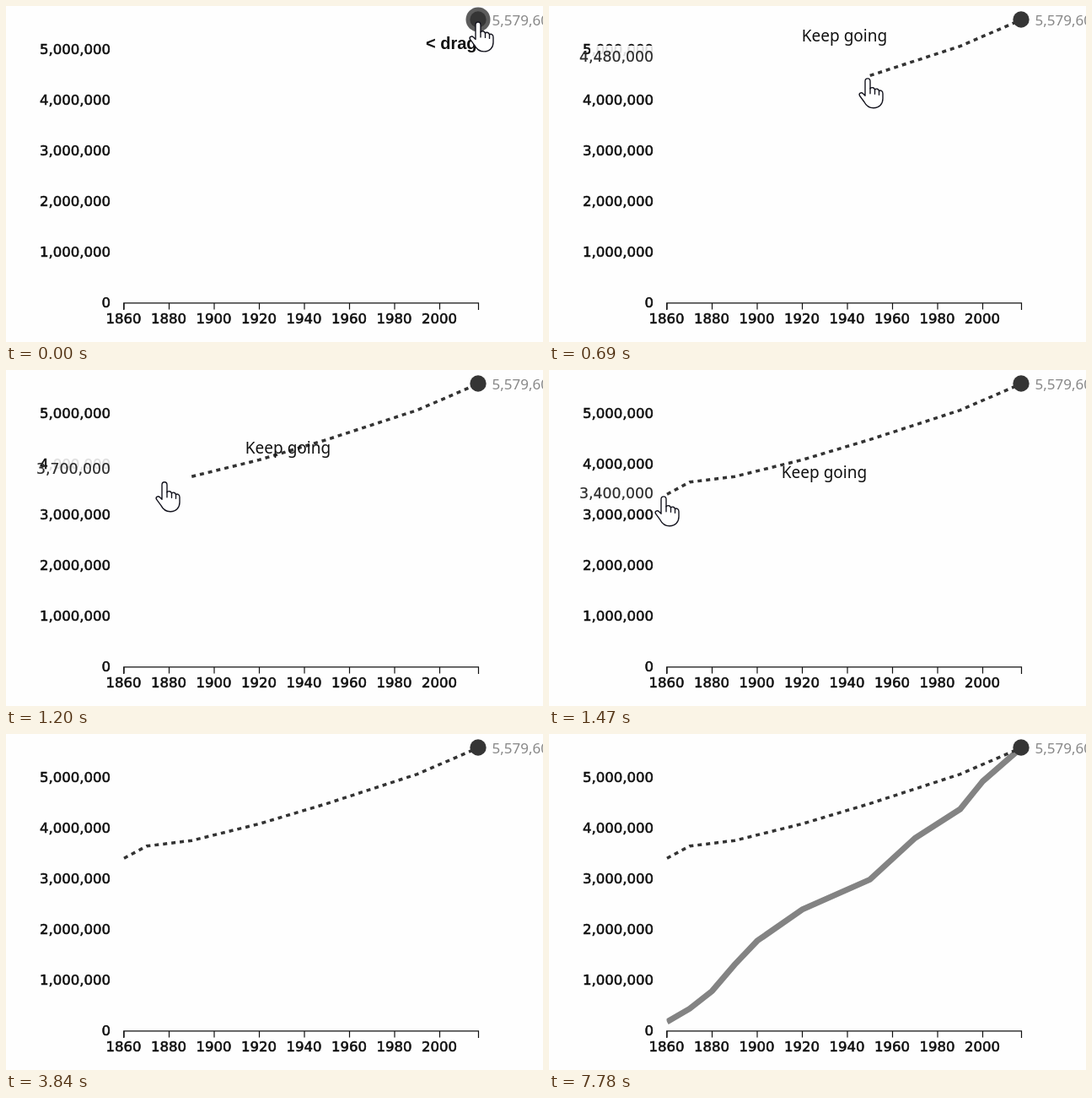
Write an HTML page that moves like this. It is 637x398 px and loops after 8000 ms.

```html
<!DOCTYPE html>
<html lang="en">
<head>
<meta charset="utf-8">
<title>Draw the line</title>
<style>
html, body { margin: 0; width: 100%; height: 100%; overflow: hidden; background: #fefefe; }
svg { display: block; width: 637px; height: 398px; }
.tick { font: 16.5px "DejaVu Sans", sans-serif; fill: #111; stroke: #111; stroke-width: .6; }
.guess { font: 17.3px "DejaVu Sans", sans-serif; fill: #2a2a2a; stroke: #2a2a2a; stroke-width: .2; }
.total { font: 300 17px "Noto Sans", sans-serif; fill: #888; }
.drag { font: bold 20px "Liberation Sans", Arial, sans-serif; fill: #111; }
.hint { font: 19px "Noto Sans", sans-serif; fill: #111; }
.axis { fill: none; stroke: #111; stroke-width: 1.2; }
.cursor path { fill: #fff; stroke: #15151f; stroke-width: 1.4; stroke-linejoin: round; stroke-linecap: round; }
</style>
</head>
<body>
<svg viewBox="0 0 637 398">
  <defs><clipPath id="reveal"><rect id="window" y="0" width="421" height="351"/></clipPath></defs>
  <g id="axes"></g>
  <rect id="veil" x="49" width="76" height="26" fill="#fefefe" opacity=".87"/>
  <text id="guess" class="guess" x="124" text-anchor="end"></text>
  <polyline id="actual" fill="none" stroke="#838383" stroke-width="7" clip-path="url(#reveal)"/>
  <polyline id="drawn" fill="none" stroke="#333" stroke-width="3.5" stroke-dasharray="5 5"/>
  <circle id="halo" cx="560" cy="16" r="14.5" fill="#5c5c5c"/>
  <circle cx="560" cy="16" r="9.7" fill="#353535"/>
  <text class="total" x="576.5" y="22.5">5,579,600</text>
  <text id="drag" class="drag" x="498" y="51">&lt; drag</text>
  <text id="hint" class="hint" text-anchor="middle">Keep going</text>
  <g id="hand" class="cursor">
    <path d="M-3 3.5C-3-1 3-1 3 3.5V12C5 10 8 11 8.5 13.5C10 11.5 13 12.5 13.5 15C15 13.5 18 14.5 18 18V24C18 30 14 35 7 35C1 35-2 32-4 28L-9.5 20.5C-11 17.5-7.5 16-5.5 18L-3 20.5Z"/>
    <path d="M3 12V18M8.5 13.5V18.5M13.5 15V19.5"/>
  </g>
  <g id="arrow" class="cursor"><path d="M0 0V23L5.5 18L9.5 27L13.5 25.3L9.5 16.5H17Z"/></g>
</svg>
<script>
const $ = id => document.getElementById(id);
const LOOP = 8000;
const STEPS_PER_SECOND = 7.5;
const REVEAL = { start: 3840, step: 130, steps: 7 };
const FIRST = 1860, LAST = 2017;

// Corners of both curves: [year, millions]
const GUESS = [[1860, 3.4], [1870, 3.64], [1890, 3.75], [1920, 4.08], [1950, 4.48], [1990, 5.06], [2017, 5.58]];
const ACTUAL = [[1860, .17], [1870, .43], [1880, .78], [1890, 1.3], [1900, 1.77], [1920, 2.39],
  [1950, 2.98], [1970, 3.8], [1990, 4.37], [2000, 4.92], [2017, 5.58]];

const clamp = (v, lo, hi) => Math.max(lo, Math.min(hi, v));
const xOf = year => 140 + (year - FIRST) * 2.675;
const yOf = millions => 351.2 - millions * 60;
const decadeAt = x => clamp(Math.ceil((FIRST + (x - 140) / 2.675) / 10 - 0.02) * 10, FIRST, LAST);
const path = curve => curve.map(([year, v]) => [xOf(year), yOf(v)].join()).join(" ");

function guessAt(year) {
  const i = clamp(GUESS.findIndex(([y]) => y >= year), 1, GUESS.length - 1);
  const [[y0, v0], [y1, v1]] = [GUESS[i - 1], GUESS[i]];
  return v0 + (v1 - v0) * (year - y0) / (y1 - y0);
}

const show = (id, on) => $(id).setAttribute("visibility", on ? "visible" : "hidden");
const move = (id, x, y) => $(id).setAttribute("transform", `translate(${x} ${y})`);

function buildAxes() {
  let out = '<path class="axis" d="M139.7 360V351.8H560.5V360"/>';
  for (let i = 0; i <= 5; i++) {
    out += `<text class="tick" x="124" y="${357 - 60 * i}" text-anchor="end">${(i * 1e6).toLocaleString("en-US")}</text>`;
  }
  for (let year = FIRST; year <= 2000; year += 20) {
    const x = xOf(year);
    out += `<path class="axis" d="M${x} 352V359.5"/><text class="tick" x="${x - 0.5}" y="375.5" text-anchor="middle">${year}</text>`;
  }
  $("axes").innerHTML = out;
}

function drawDrag(n, labelled) {
  const handX = clamp(378 - 47.5 * (n - 5), 136, 560);
  const handYear = clamp(FIRST + (handX - 140) / 2.675, FIRST, LAST);
  move("hand", handX, yOf(guessAt(handYear)) + 2.5);
  show("hand", n < 17);
  move("arrow", 133 + 45 * (n - 17), 162 + 64 * (n - 17));
  show("arrow", n >= 17 && n < 20);
  show("halo", n < 1);
  show("drag", n < 1);

  // The line trails the hand and grows a decade at a time
  const tip = decadeAt(380 - 40 * (n - 5));
  $("drawn").setAttribute("points", path([[tip, guessAt(tip)], ...GUESS.filter(([y]) => y > tip)]));

  const baseline = clamp(66 + 14.25 * (n - 5), 22, 152);
  show("guess", labelled);
  show("veil", labelled);
  $("veil").setAttribute("y", baseline - 19);
  $("guess").setAttribute("y", baseline);
  const value = Math.round(guessAt(decadeAt(handX)) * 50) * 20000;
  $("guess").textContent = value.toLocaleString("en-US");

  move("hint", 350.5 - 4 * (n - 5), baseline - 24);
  show("hint", n >= 3 && n < 12);
}

function draw(t) {
  const n = Math.floor(t * STEPS_PER_SECOND / 1000);
  drawDrag(n, n >= 1 && t < REVEAL.start);

  // The true curve is uncovered from right to left
  const k = clamp(Math.floor((t - REVEAL.start) / REVEAL.step) / REVEAL.steps, 0, 1);
  $("window").setAttribute("x", 560 - 420.5 * (1 - Math.cos(Math.PI * k)) / 2);
}

buildAxes();
$("actual").setAttribute("points", path(ACTUAL));
const began = performance.now();
function tick() {
  draw((performance.now() - began) % LOOP);
  requestAnimationFrame(tick);
}
tick();
</script>
</body>
</html>
```
